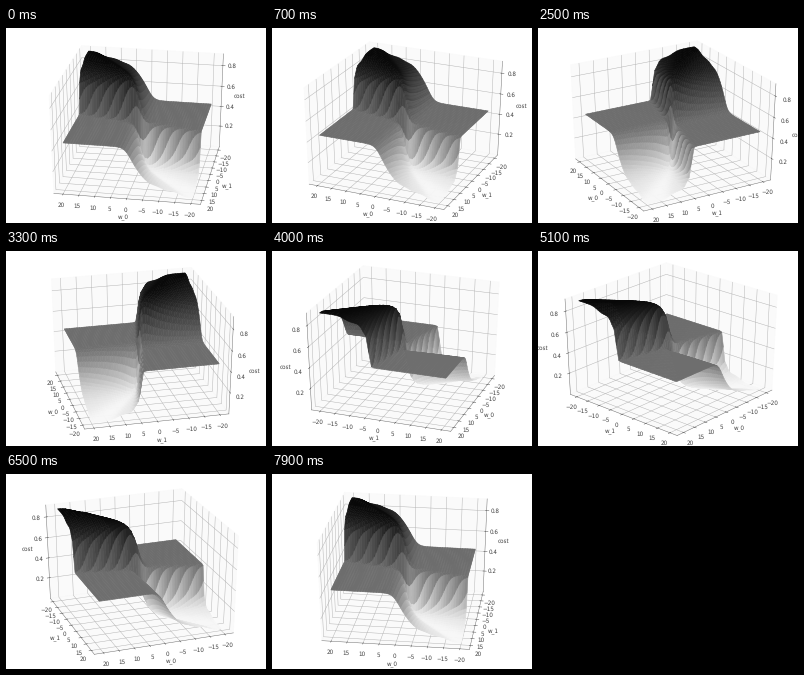
A matplotlib script for the animation above (8000 ms loop, 260 by 195 pixels).

```python
import numpy as np
import matplotlib.pyplot as plt
from matplotlib.animation import FuncAnimation
from matplotlib.colors import LinearSegmentedColormap

plt.rcParams.update({
    "text.hinting": "none", "axes.labelcolor": "0.25", "axes.edgecolor": "0.4",
    "xtick.color": "0.25", "ytick.color": "0.25"})
for name in "xyz":
    plt.rcParams[f"axes3d.{name}axis.panecolor"] = (0.97, 0.97, 0.97, 0.5)

FRAMES = 80
Z_LOW, Z_HIGH = 0.005, 0.895
PAD = 25 / 24  # gap between the data limits and the panes

# Steps along w0 = -slope * w1: slope, share of the height
FAN = [(0.0, 0.10), (0.06, 0.12), (0.17, 0.10),
       (0.28, 0.07), (0.5, 0.05), (0.8, 0.06)]
# Steps along w1 = -slope * w0: slope, share of the height, steepness
CLIFF = [(0.225, 0.32, 4.5), (0.32, 0.12, 2), (0.6, 0.06, 1)]


def sigmoid(v):
    return 1 / (1 + np.exp(-np.clip(v, -60, 60)))


def cost_level(w0, w1):
    """Cost from 0 to 1: a fan of steps that all pass through the origin."""
    level = sum(height * sigmoid(1.1 * (w0 + slope * w1))
                for slope, height in FAN)
    level = level + sum(height * sigmoid(-steep * (w1 + slope * w0))
                        for slope, height, steep in CLIFF)
    return (level - level.min()) / np.ptp(level)


def cell_mean(a):
    return (a[:-1, :-1] + a[1:, :-1] + a[:-1, 1:] + a[1:, 1:]) / 4


grays = LinearSegmentedColormap.from_list("grays", [
    (0.0, "0.97"), (0.25, "0.71"), (0.5, "0.43"),
    (0.8, "0.23"), (1.0, "0.03")])

weights = np.linspace(-20, 20, 50)
w0, w1 = np.meshgrid(weights, weights)
level = cost_level(w0, w1)

fig = plt.figure(figsize=(6.4, 4.8), dpi=40.625, facecolor="white")
ax = fig.add_axes([0, 0, 1, 1], projection="3d")
ax.apply_aspect = lambda *args, **kwargs: None  # fill the whole figure
ax.set_box_aspect((1, 1, 1), zoom=3 ** 0.5 / 1.8294640721620434)

ax.plot_surface(w0, w1, Z_LOW + (Z_HIGH - Z_LOW) * level,
                rstride=1, cstride=1, facecolors=grays(cell_mean(level)),
                shade=False, linewidth=1, antialiased=True)

middle, half = (Z_LOW + Z_HIGH) / 2, (Z_HIGH - Z_LOW) / 2
ax.set_xlim(-22 * PAD, 22 * PAD)
ax.set_ylim(-22 * PAD, 22 * PAD)
ax.set_zlim(middle - half * PAD, middle + half * PAD)
ax.set_xticks(range(-20, 21, 5))
ax.set_yticks(range(-20, 21, 5))
ax.set_zticks([0.2, 0.4, 0.6, 0.8])
ax.set_xlabel("w_0")
ax.set_ylabel("w_1")
ax.set_zlabel("cost")


def update(i):
    ax.view_init(elev=30, azim=20 + (80 + 2 * i) % 160)
    return []


anim = FuncAnimation(fig, update, frames=FRAMES, interval=100,
                     repeat=True, repeat_delay=0, blit=False)
plt.show()
```
